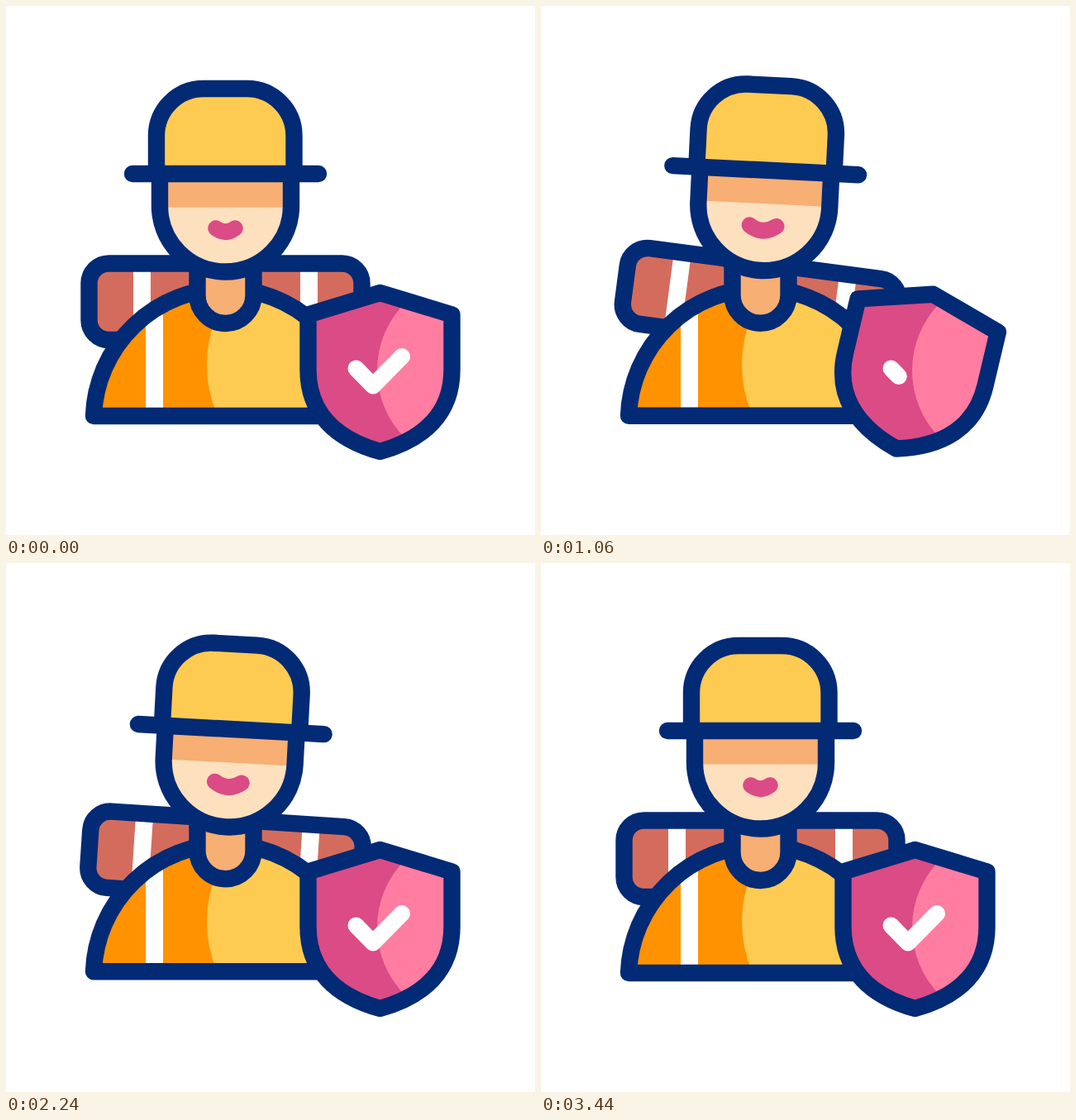
An HTML page for the animation above (3600 ms loop, 640 by 640 pixels).

```html
<!DOCTYPE html>
<html lang="en">
<head>
<meta charset="utf-8">
<title>Protected traveller</title>
<style>
  html, body { margin: 0; width: 100%; height: 100%; overflow: hidden; background: #fff; }
  svg { display: block; width: 100vw; height: 100vh; }
  .line { fill: none; stroke: #032a75; stroke-width: 20.4; stroke-linecap: round; stroke-linejoin: round; }
  .butt { stroke-linecap: butt; }
  .white { fill: #fff; }
  .yellow { fill: #fecb52; }
  .tan { fill: #f7af73; }
</style>
</head>
<body>
<svg viewBox="0 0 640 640">
  <defs>
    <rect id="packShape" x="100.5" y="311.5" width="330" height="92.5" rx="24"/>
    <path id="bodyShape" d="M106 496A159.6 159.6 0 0 1 425 496Z"/>
    <path id="neckShape" d="M231.5 300V350a34 34 0 0 0 68 0V300"/>
    <rect id="faceShape" x="186" y="125.5" width="159" height="196" rx="79.5"/>
    <path id="hatShape" d="M182 203V157a57 57 0 0 1 57-57H291.500a57 57 0 0 1 57 57V203"/>
    <path id="shieldShape" d="M452.500 347L539.500 373.500V440C539.500 493 506 524 452.500 539C399 524 365.500 493 365.500 440V373.500Z"/>
    <clipPath id="packClip"><use href="#packShape"/></clipPath>
    <clipPath id="bodyClip"><use href="#bodyShape"/></clipPath>
    <clipPath id="faceClip"><use href="#faceShape"/></clipPath>
    <clipPath id="shieldClip"><use href="#shieldShape"/></clipPath>
  </defs>

  <g id="pack">
    <g clip-path="url(#packClip)">
      <use href="#packShape" fill="#d46c5d"/>
      <path class="white" d="M154 300h21v120h-21zM356 300h21v120h-21z"/>
    </g>
    <use href="#packShape" class="line"/>
  </g>

  <g id="body">
    <g clip-path="url(#bodyClip)">
      <use href="#bodyShape" fill="#ff9200"/>
      <circle id="glow" class="yellow" cx="396" cy="434" r="153"/>
      <path class="white" d="M169 330h21v170h-21z"/>
    </g>
    <use href="#bodyShape" class="line"/>
    <use href="#neckShape" class="tan"/>
    <use href="#neckShape" class="line butt"/>
  </g>

  <g id="head">
    <g clip-path="url(#faceClip)">
      <use href="#faceShape" fill="#fde0be"/>
      <rect id="shade" class="tan" x="180" y="120" width="170" height="123.500"/>
    </g>
    <use href="#faceShape" class="line"/>
    <path id="mouth" fill="none" stroke="#db4b86" stroke-width="19.500" stroke-linecap="round"/>
  </g>

  <g id="hat">
    <use href="#hatShape" class="yellow"/>
    <use href="#hatShape" class="line butt"/>
    <path class="line" d="M153 203H378"/>
  </g>

  <g id="shield">
    <g clip-path="url(#shieldClip)">
      <use href="#shieldShape" fill="#db4b86"/>
      <g id="shine"><circle cx="565" cy="441" r="116" fill="#ff7da0"/></g>
    </g>
    <use href="#shieldShape" class="line"/>
  </g>
  <path id="check" d="M423.500 438.500L444 459.500L479 424" pathLength="1" fill="none"
        stroke="#fff" stroke-width="20" stroke-linecap="round" stroke-linejoin="round"/>
</svg>

<script>
const LOOP = 3600;
const beats = [0, 590, 1110, 1680, 2220, 2740, 3280];
const onBeats = values => values.map((v, i) => [beats[i], v]);

// Each track is a list of [time in ms, value].
const tracks = {
  bodyLift:  onBeats([0, 11.3, 0, 12, 1.7, 11, 0]),
  headLift:  onBeats([0, 24.4, 1, 24.5, 2, 24.1, 0]),
  hatLift:   onBeats([0, 32.4, 2.3, 19.4, 0, 13, 0]),
  headTurn:  onBeats([0, -9.5, 3.1, -4.3, 3.1, -1.6, 0]),
  packTurn:  onBeats([0, -9.9, 7.9, -6.2, 3.8, -2, 0]),
  smile:     [[200, 0], [1000, 1], [2560, 1], [3200, 0]],
  shieldTurn: [[0, 0], [550, -32.3], [1080, 13.5], [2080, 0]],
  checkTurn: [[0, 0], [560, -58], [1060, 0]],
  checkDraw: [[250, 1], [850, 0], [900, 0], [1500, 1]]
};

function sample(track, t) {
  const next = track.findIndex(([time]) => time > t);
  if (next === 0) return track[0][1];
  if (next < 0) return track[track.length - 1][1];
  const [t0, a] = track[next - 1], [t1, b] = track[next];
  return a + (b - a) * (1 - Math.cos(Math.PI * (t - t0) / (t1 - t0))) / 2;
}

const part = id => document.getElementById(id);
const [pack, body, glow, head, shade, mouth, hat, shield, shine, check] =
  ['pack', 'body', 'glow', 'head', 'shade', 'mouth', 'hat', 'shield', 'shine', 'check'].map(part);

function place(el, lift, turn = 0, x = 0, y = 0) {
  el.setAttribute('transform', `translate(0 ${-lift}) rotate(${turn} ${x} ${y})`);
}

function draw(t) {
  const at = name => sample(tracks[name], t);
  const bodyLift = at('bodyLift'), headLift = at('headLift');
  const hatLift = at('hatLift'), headTurn = at('headTurn');

  place(pack, bodyLift, at('packTurn'), 265.5, 357.5);
  place(body, bodyLift);
  place(glow, -bodyLift); // the shading stays put
  place(head, headLift, headTurn, 265.5, 329);
  place(shade, hatLift);
  place(hat, headLift + hatLift, headTurn, 265.5, 329);

  const s = at('smile'), half = 11.5 + 4.7 * s, top = 269 - 1.7 * s;
  mouth.setAttribute('d',
    `M${265.5 - half} ${top}Q265.5 ${546.4 - top} ${265.5 + half} ${top}`);

  const turn = at('shieldTurn');
  place(shield, 0, turn, 456, 441);
  place(shine, 0, -turn, 456, 441);

  const drawn = at('checkDraw');
  place(check, 0, at('checkTurn'), 452.5, 443);
  check.setAttribute('stroke-dasharray', drawn < 1 ? `${drawn} 2` : 'none');
  check.setAttribute('visibility', drawn > 0.001 ? 'visible' : 'hidden');
}

const start = performance.now();
function tick() {
  draw((performance.now() - start) % LOOP);
  requestAnimationFrame(tick);
}
tick();
</script>
</body>
</html>
```
